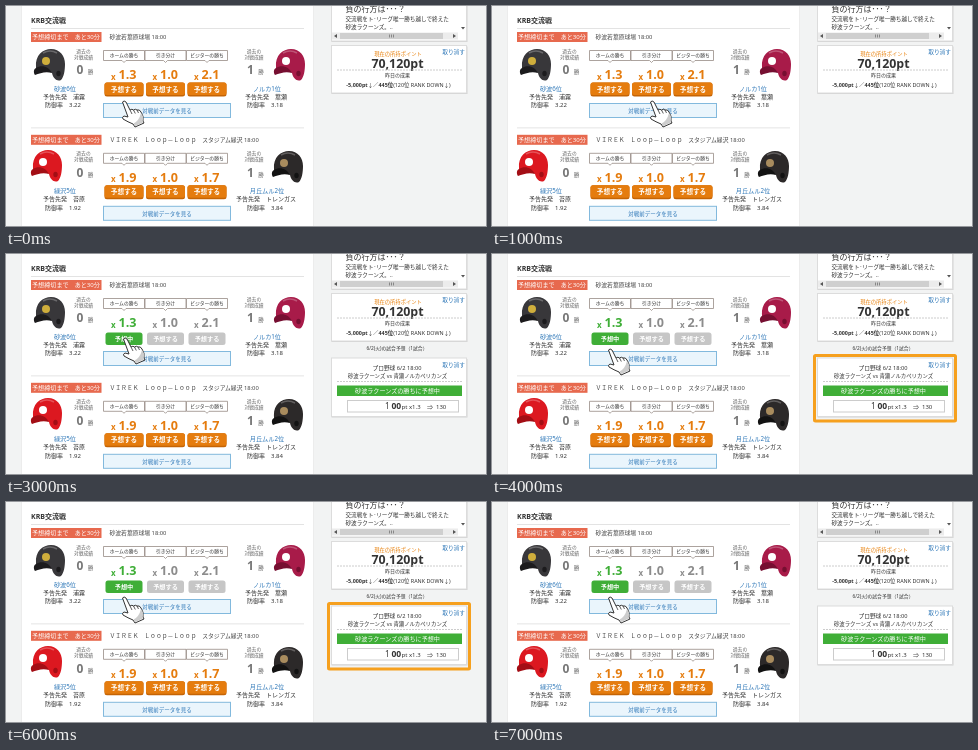
An HTML page that plays this animation: 480x220 px, repeating every 8000 ms.

```html
<!DOCTYPE html>
<html>
<head>
<meta charset="utf-8">
<style>
html, body { margin: 0; width: 100%; height: 100%; overflow: hidden; background: #f2f3f3; }
svg { display: block; font-family: "Noto Sans", "Noto Sans CJK JP", sans-serif; }
text { white-space: pre; }
</style>
</head>
<body>
<svg id="stage" width="480" height="220" viewBox="0 0 480 220"></svg>
<script>
const ORANGE = '#e57c0e', GREEN = '#3fae37', BLUE = '#2f78b8', INK = '#333';
const COLUMNS = [118, 159.5, 201];

const text = (x, y, size, str, fill = INK, anchor = 'middle', weight = 400) =>
  `<text x="${x}" y="${y}" font-size="${size}" fill="${fill}" text-anchor="${anchor}" font-weight="${weight}">${str}</text>`;
const rect = (x, y, w, h, fill, stroke = 'none', extra = '') =>
  `<rect x="${x}" y="${y}" width="${w}" height="${h}" fill="${fill}" stroke="${stroke}" ${extra}/>`;
const path = (d, fill, extra = '') => `<path d="${d}" fill="${fill}" ${extra}/>`;
const group = (id, body) => `<g id="${id}">${body}</g>`;
const dashes = (x, y, w) => path(`M${x} ${y}h${w}`, 'none', 'stroke="#ccc" stroke-dasharray="2 1"');
const card = (y, h) => rect(325.5, y + 1, 136, h, '#d4d4d4') + rect(325.5, y, 135, h, '#fff', '#dcdcdc');

const helmet = (x, y, color, shade, badge) => `<g transform="translate(${x} ${y})">
  ${path('M2 18C1 6 9 0 17 0C26 0 31 7 31 15C31 21 30 28 27 31C23 33 19 29 18 24C13 20 7 20 2 22Z', color)}
  ${path('M2 19C8 15 15 18 18 24C12 22 6 24 1 26C-1 23 0 20 2 19Z', shade)}
  ${path('M9 4Q16 0 23 4', 'none', 'stroke="#fff" stroke-opacity=".25" stroke-width="1.5"')}
  <ellipse cx="24.5" cy="24.5" rx="2.2" ry="2.8" fill="${shade}"/>
  <circle cx="12" cy="12" r="4" fill="${badge}"/></g>`;

const record = (x, wins) =>
  text(x, 46.5, 4.8, '過去の', '#666') + text(x, 52.5, 4.8, '対戦成績', '#666') +
  text(x - 3.5, 68, 12, wins, '#777', 'middle', 600) + text(x + 7, 68, 5.5, '勝', '#666');

const team = (x, { name, rank, pitcher, era }) =>
  text(x, 84.5, 6.2, `${name}${rank}位`, BLUE, 'middle', 500) +
  text(x - 1, 92.5, 6, `予告先発　${pitcher}`) +
  text(x - 2, 101, 6, `防御率　${era}`);

const odd = (i, value, color) =>
  text(COLUMNS[i] - 13, 73.5, 8, 'x', color, 'start', 600) +
  text(COLUMNS[i] + 3.5, 73, 12.6, value, color, 'middle', 600);

const openBets = odds => odds.map((value, i) => odd(i, value, ORANGE) +
  rect(COLUMNS[i] - 19.5, 76.5, 39, 14, '#c56405', 'none', 'rx="2.5"') +
  rect(COLUMNS[i] - 19.5, 76.5, 39, 12.5, ORANGE, 'none', 'rx="2.5"') +
  text(COLUMNS[i], 85.6, 6.6, '予想する', '#fff', 'middle', 700)).join('');

const pickedBets = odds => odds.map((value, i) => odd(i, value, i ? '#8c8c8c' : GREEN) +
  rect(COLUMNS[i] - 18.5, 78.5, 37, 12.5, i ? '#c6c6c6' : GREEN, 'none', 'rx="2.5"') +
  text(COLUMNS[i], 87, 6.2, i ? '予想する' : '予想中', '#fff', 'middle', 700)).join('');

const match = (y, venue, home, away, bets) => `<g transform="translate(0 ${y})">
  ${rect(25, 26, 70.5, 10, '#e7694e')}
  ${text(60, 33.3, 6.1, '予想締切まで　あと30分', '#fff')}
  ${text(103.5, 33.3, 5.8, venue + ' 18:00', '#444', 'start')}
  ${record(77.5, home.wins)}${record(248, away.wins)}
  ${team(59, home)}${team(261, away)}
  ${['ホームの勝ち', '引き分け', 'ビジターの勝ち'].map((label, i) =>
    path(`M${COLUMNS[i] - 20.5} 44.5h41v10h-18.5l-2 2l-2 -2h-18.5z`, '#fff', 'stroke="#978c86" stroke-width=".8"') +
    text(COLUMNS[i], 51.2, 4.8, label, INK, 'middle', 500)).join('')}
  ${bets}
  ${rect(97.5, 97.5, 127, 14, '#eaf5fc', '#82b9dd')}
  ${text(161, 106.8, 5.5, '対戦前データを見る', BLUE)}</g>`;

const mainPanel =
  rect(15.5, -1, 292, 222, '#fff', '#ececec') +
  text(25, 17, 7, 'KRB交流戦', INK, 'start', 700) +
  rect(25, 22, 273, .8, '#ddd') + rect(25, 121.5, 273, .8, '#ddd') +
  match(0, '砂波若葉原球場',
    { name: '砂波', rank: 6, pitcher: '浦霧', era: '3.22', wins: 0 },
    { name: 'ノルカ', rank: 1, pitcher: '葉瀬', era: '3.18', wins: 1 },
    group('open', openBets(['1.3', '1.0', '2.1'])) + group('picked', pickedBets(['1.3', '1.0', '2.1']))) +
  match(102.8, 'ＶＩＲＥＫ　Ｌｏｏｐ－Ｌｏｏｐ　スタジアム緑沢',
    { name: '緑沢', rank: 5, pitcher: '苔原', era: '1.92', wins: 0 },
    { name: '月丘ムル', rank: 2, pitcher: 'トレンガス', era: '3.84', wins: 1 },
    openBets(['1.9', '1.0', '1.7'])) +
  helmet(28, 43, '#38373a', '#1c1b1d', '#cfae3c') +
  helmet(268, 43, '#a81b49', '#760f31', '#fff') +
  helmet(25, 144, '#dc1820', '#a30e15', '#fff') +
  helmet(266, 145, '#2c2929', '#121212', '#a98c5e');

const sidebar =
  card(-2, 37) +
  text(339.5, 6, 8, '負の行方は･･･？', INK, 'start', 500) +
  text(339.5, 15, 5.6, '交流戦をト･リーグ唯一勝ち越しで終えた', INK, 'start') +
  text(339.5, 22.5, 5.6, '砂波ラクーンズ。..', INK, 'start') +
  rect(326, 26.5, 126, 7, '#ececec') + rect(334, 27, 103, 6, '#cfcfcf') +
  path('M331 28v4l-3 -2zM447 28v4l3 -2zM455 21h4l-2 2.5z', '#555') +
  path('M383.5 28.5v3m2 -3v3m2 -3v3', 'none', 'stroke="#777" stroke-width=".8"') +
  card(39.5, 47.5) +
  text(392, 50, 5.3, '現在の所持ポイント', '#e8820e', 'middle', 500) +
  text(459, 48, 5.7, '取り消す', BLUE, 'end') +
  text(391.5, 62, 12.4, '70,120pt', INK, 'middle', 600) +
  dashes(331, 64, 125) +
  text(391.5, 70.5, 5, '昨日の成果', INK, 'middle', 500) +
  text(392.5, 81, 5.4, '<tspan font-weight="600">-5,000pt</tspan>↓／<tspan font-weight="600">445位</tspan>(120位 RANK DOWN↓)');

const prediction =
  text(391, 96, 4.8, '6/2(火)の試合予想（1試合）') +
  card(104, 58.5) +
  text(391, 115.5, 5.7, 'プロ野球 6/2 18:00') +
  text(459, 113, 5.7, '取り消す', BLUE, 'end') +
  text(391.5, 124, 5.4, '砂波ラクーンズ vs 青瀬ノルカペリカンズ', INK, 'middle', 500) +
  dashes(331, 127.5, 125) +
  rect(331, 131.5, 125, 10.5, GREEN) +
  text(391.5, 139, 6.1, '砂波ラクーンズの勝ちに予想中', '#fff') +
  rect(341.5, 146.5, 111, 11.5, '#fff', '#ccc') +
  text(379, 155, 8, '1', INK, 'start', 500) +
  text(385.5, 155, 8.5, '00', INK, 'start', 600) +
  text(395.5, 155, 6, 'pt x1.3', INK, 'start') +
  text(421, 155, 6, '⇒', INK, 'start') +
  text(430, 155, 6, '130', INK, 'start');

const highlight = rect(322.5, 101.5, 141, 65.5, 'none', '#f6a01e', 'stroke-width="3" rx="1"');

// Pointing hand, fingertip at the origin.
const hand = path('M-1.5 1Q0 -1 2 1L6 9Q8 7.5 9.5 9Q11.5 7.5 13 9Q15.5 8 17 11Q20 15 19 20L20 22L11 26L9 23Q4 21 -1 18Q-2.5 16 0 15L4 16Z',
  '#fff', 'stroke="#333" stroke-width="1" stroke-linejoin="round"') +
  path('M17 12Q20 15 18.5 20L19 21.5L11.3 25L9.5 22.5Q15 20 17 12Z', '#cdcdcd') +
  path('M6 9l2 4M9.5 9l1.8 3.5M13 9l1.5 3', 'none', 'stroke="#333" stroke-width=".8"');

const get = id => document.getElementById(id);
get('stage').innerHTML = mainPanel + sidebar + group('prediction', prediction) +
  group('highlight', highlight) + group('hand', hand);

const show = (id, on) => get(id).setAttribute('display', on ? 'inline' : 'none');
const handStops = [[118, 95], [160, 95], [202, 95], [119, 84]];

function draw(now) {
  const second = Math.floor(now % 8000 / 1000);
  const picked = second >= 3;
  show('open', !picked);
  show('picked', picked);
  show('prediction', picked);
  show('highlight', second === 4 || second === 6);
  get('hand').setAttribute('transform', `translate(${handStops[second] || handStops[0]})`);
  requestAnimationFrame(() => draw(performance.now()));
}
draw(performance.now());
</script>
</body>
</html>
```
